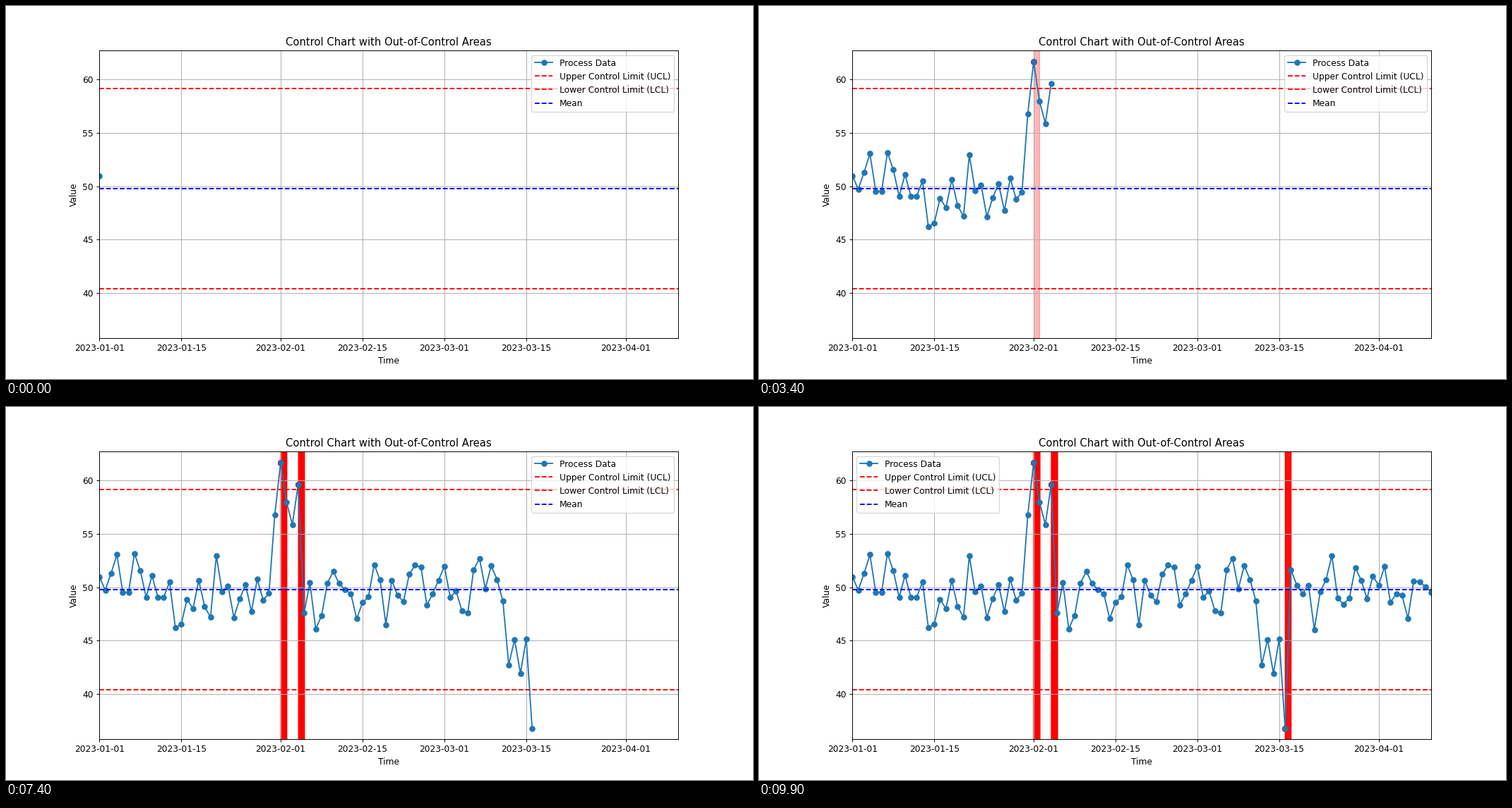
Recreate the animation shown at these times as a matplotlib script. Size 1058 px wide and 529 px high, loop 10 s.

```python
import numpy as np
import matplotlib.pyplot as plt
from matplotlib.animation import FuncAnimation
from matplotlib.dates import date2num

COUNT = 100

# Process values: steady noise with one high run and one low run
rng = np.random.RandomState(42)
values = rng.normal(50, 2, COUNT)
values[30:35] += 8
values[70:75] -= 8
dates = np.datetime64("2023-01-01") + np.arange(COUNT)

mean = values.mean()
spread = 3 * values.std(ddof=1)
outliers = np.flatnonzero(np.abs(values - mean) > spread)

fig, ax = plt.subplots(figsize=(12, 6), dpi=88.1667)
line, = ax.plot(dates, values, marker="o", label="Process Data")
ax.axhline(mean + spread, color="red", ls="--",
           label="Upper Control Limit (UCL)")
ax.axhline(mean - spread, color="red", ls="--",
           label="Lower Control Limit (LCL)")
ax.axhline(mean, color="blue", ls="--", label="Mean")

# Every step lays one more thin red layer over each outlier's day
layers = [
    (i, step, ax.axvspan(dates[i], dates[i + 1], color="red", alpha=0.1))
    for i in outliers
    for step in range(i + 1, COUNT)
]
dots = ax.scatter([], [], s=36, color="red")

ax.set_xlim(dates[0], dates[-1])
ax.set_ylim(values.min() - 1, values.max() + 1)
ax.set_title("Control Chart with Out-of-Control Areas")
ax.set_xlabel("Time")
ax.set_ylabel("Value")
ax.grid(True)
legend = ax.legend(loc="upper right")

days = date2num(dates)


def update(n):
    line.set_data(dates[:n + 1], values[:n + 1])
    shown = []
    for i, step, span in layers:
        span.set_visible(step <= n)
        if step <= n:
            shown.append((days[i], values[i]))
    dots.set_offsets(np.array(shown).reshape(-1, 2))
    # The legend makes room once the last red band appears beneath it
    legend.set_loc("upper left" if n > outliers[-1] else "upper right")
    return line, dots, legend


anim = FuncAnimation(fig, update, frames=COUNT, interval=100,
                     init_func=lambda: update(0), repeat=True,
                     repeat_delay=0, blit=False)
plt.show()
```
